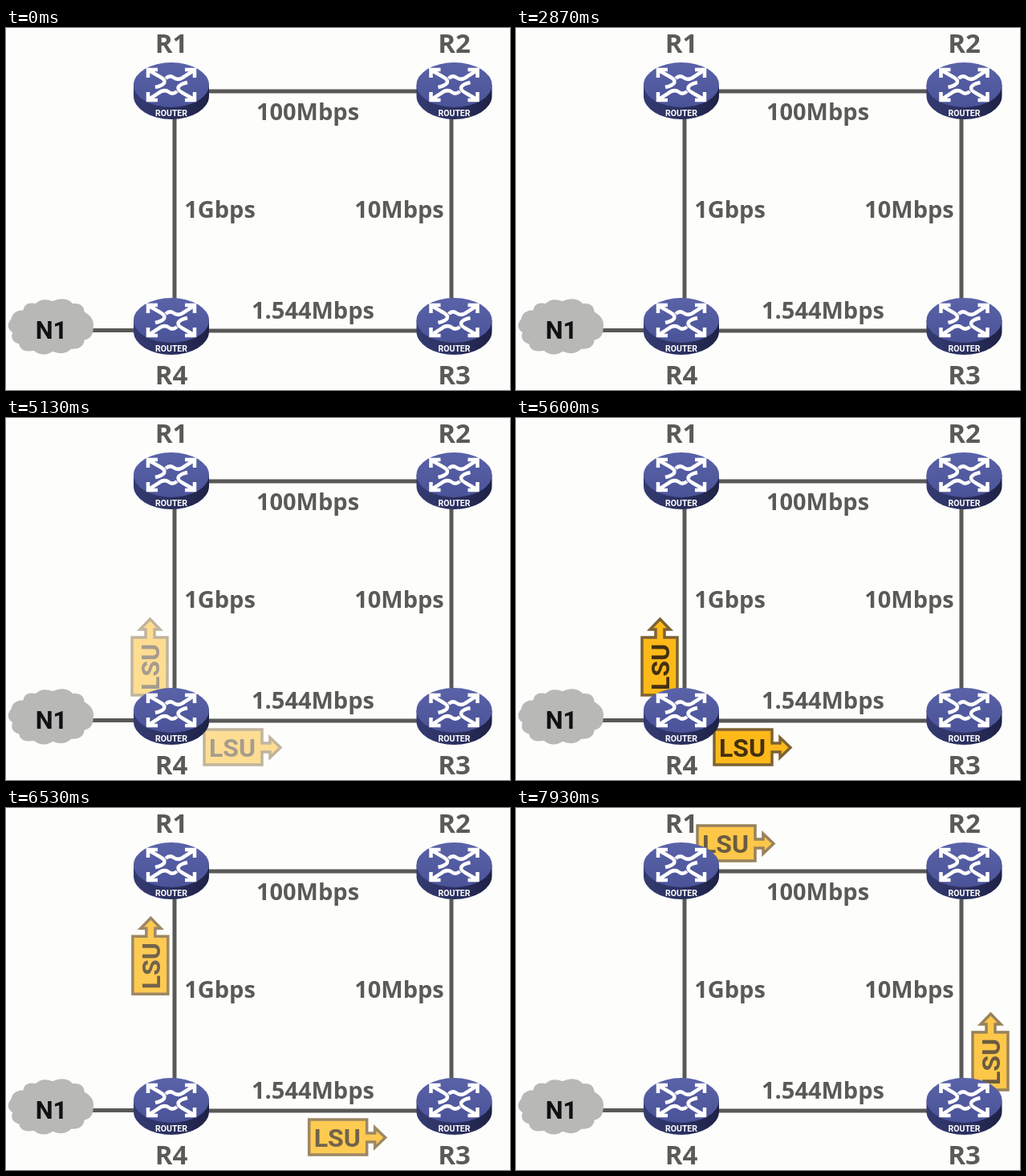
Animation of 628 by 452 pixels, one loop 8 s. Source, as an HTML page:

```html
<!DOCTYPE html>
<html lang="en">
<head>
<meta charset="utf-8">
<title>Link state update flooding</title>
<style>
  html, body { margin: 0; width: 100%; height: 100%; overflow: hidden; background: #fdfdfc; }
  svg { display: block; width: 628px; height: 452px; }
  .link { stroke: #595957; stroke-width: 5; fill: none; }
  .label { font: bold 29px "Open Sans", "Noto Sans", sans-serif; fill: #5b5a57; text-anchor: middle; }
  .name { font-size: 33px; }
  .narrow { font-family: Roboto, "Liberation Sans", sans-serif; font-weight: bold; text-anchor: middle; }
  .arrow { fill: none; stroke: #fff; stroke-width: 4.5; }
</style>
</head>
<body>
<svg viewBox="0 0 628 452">
  <defs>
    <linearGradient id="side">
      <stop offset="0" stop-color="#343b70"/>
      <stop offset=".5" stop-color="#2b3060"/>
      <stop offset="1" stop-color="#1e2246"/>
    </linearGradient>
    <linearGradient id="top" x2="0" y2="1">
      <stop offset="0" stop-color="#5a62a8"/>
      <stop offset="1" stop-color="#4b5398"/>
    </linearGradient>

    <g id="arrows" class="arrow">
      <path d="M-29,-9 V-19 H-17 M-28,-18 L-14,-10 C-5,-5 -7,0 -20,3"/>
      <path d="M17,-19 H29 V-9 M28,-18 L17,-11 C11,-6 7,-6 3,-9 S-4,-11 -7,-8"/>
    </g>
    <g id="router">
      <path d="M-47,0 V14 A47,29 0 0 0 47,14 V0 Z" fill="url(#side)"/>
      <ellipse rx="47" ry="28" fill="url(#top)"/>
      <use href="#arrows"/>
      <use href="#arrows" transform="rotate(180)"/>
      <text class="narrow" y="38.5" font-size="10.5" fill="#fff">ROUTER</text>
    </g>
    <g id="packet">
      <path d="M0,0 H72 V17 H82 V10 L95,22.5 L82,35 V28 H72 V44 H0 Z"
            fill="#fdb91a" stroke="#7d6232" stroke-width="3.5"/>
      <text class="narrow" x="35" y="34" font-size="32" fill="#443010">LSU</text>
    </g>
  </defs>

  <rect width="628" height="452" fill="#fdfdfc"/>
  <path class="link" d="M245,79 H520 M210,105 V345 M555,105 V345 M245,378 H520 M100,377.5 H165"/>
  <path d="M22,353 Q24,342 37,345 Q45,337 58,342 Q74,335 83,345 Q96,343 97,355
           Q110,362 108,374 Q108,387 97,389 Q96,401 81,400 Q72,409 58,403
           Q45,411 35,402 Q18,405 17,394 Q5,391 9,380 Q-1,373 7,364 Q9,353 22,353 Z"
        fill="#b8b8b7" stroke="#b8b8b7" stroke-width="1.5"/>
  <text class="narrow" x="56.5" y="388" font-size="31" fill="#111">N1</text>
  <g id="packets"></g>
  <g id="scene"></g>
</svg>
<script>
const LOOP = 8000, STEP = LOOP / 120;
const $ = id => document.getElementById(id);

function add(parent, tag, attrs, text = "") {
  const el = document.createElementNS("http://www.w3.org/2000/svg", tag);
  for (const key in attrs) el.setAttribute(key, attrs[key]);
  el.textContent = text;
  return parent.appendChild(el);
}

const routers = [["R1", 206, 71, 31], ["R2", 558.5, 71, 31], ["R3", 558.5, 365, 445], ["R4", 206, 365, 445]];
for (const [name, x, y, baseline] of routers) {
  add($("scene"), "use", { href: "#router", x, y });
  add($("scene"), "text", { class: "label name", x, y: baseline }, name);
}

const speeds = [["100Mbps", 376, 115], ["1Gbps", 266.5, 237], ["10Mbps", 490, 237], ["1.544Mbps", 382.5, 363]];
for (const [text, x, y] of speeds) add($("scene"), "text", { class: "label", x, y }, text);

// Each hop: fade-in, travel and fade-out times, start and end point, rotation.
const first = { enter: [4900, 5400], leave: [7100, 7500] };
const second = { enter: [7500, 8050], leave: [9000, 9400] };
const hops = [
  { ...first, move: [5650, 6963], from: [247, 389], to: [421.5, 389], turn: 0 },
  { ...first, move: [5650, 6830], from: [157, 346], to: [158, 211], turn: -90 },
  { ...second, move: [8200, 9000], from: [226, 22], to: [226, 22], turn: 0 },
  { ...second, move: [8200, 9000], from: [569, 352], to: [569, 352], turn: -90 }
];
for (const hop of hops) hop.el = add($("packets"), "use", { href: "#packet" });

const clamp = v => Math.min(1, Math.max(0, v));
const progress = (t, [start, end]) => clamp((t - start) / (end - start));
const smooth = u => u * u * (3 - 2 * u);

function draw(t) {
  for (const { el, enter, leave, move, from, to, turn } of hops) {
    const u = progress(t, move), p = smooth(u);
    const [x, y] = from.map((a, i) => a + (to[i] - a) * p);
    el.setAttribute("transform", `translate(${x} ${y}) rotate(${turn})`);

    // Packets look paler while in transit.
    const pale = clamp(Math.min(u, 1 - u) * 8);
    el.style.opacity = (progress(t, enter) - progress(t, leave)) * (1 - 0.25 * pale);
  }
}

function tick() {
  const t = performance.now() % LOOP;
  draw(Math.floor((t + 5) / STEP) * STEP);
  requestAnimationFrame(tick);
}
tick();
</script>
</body>
</html>
```
